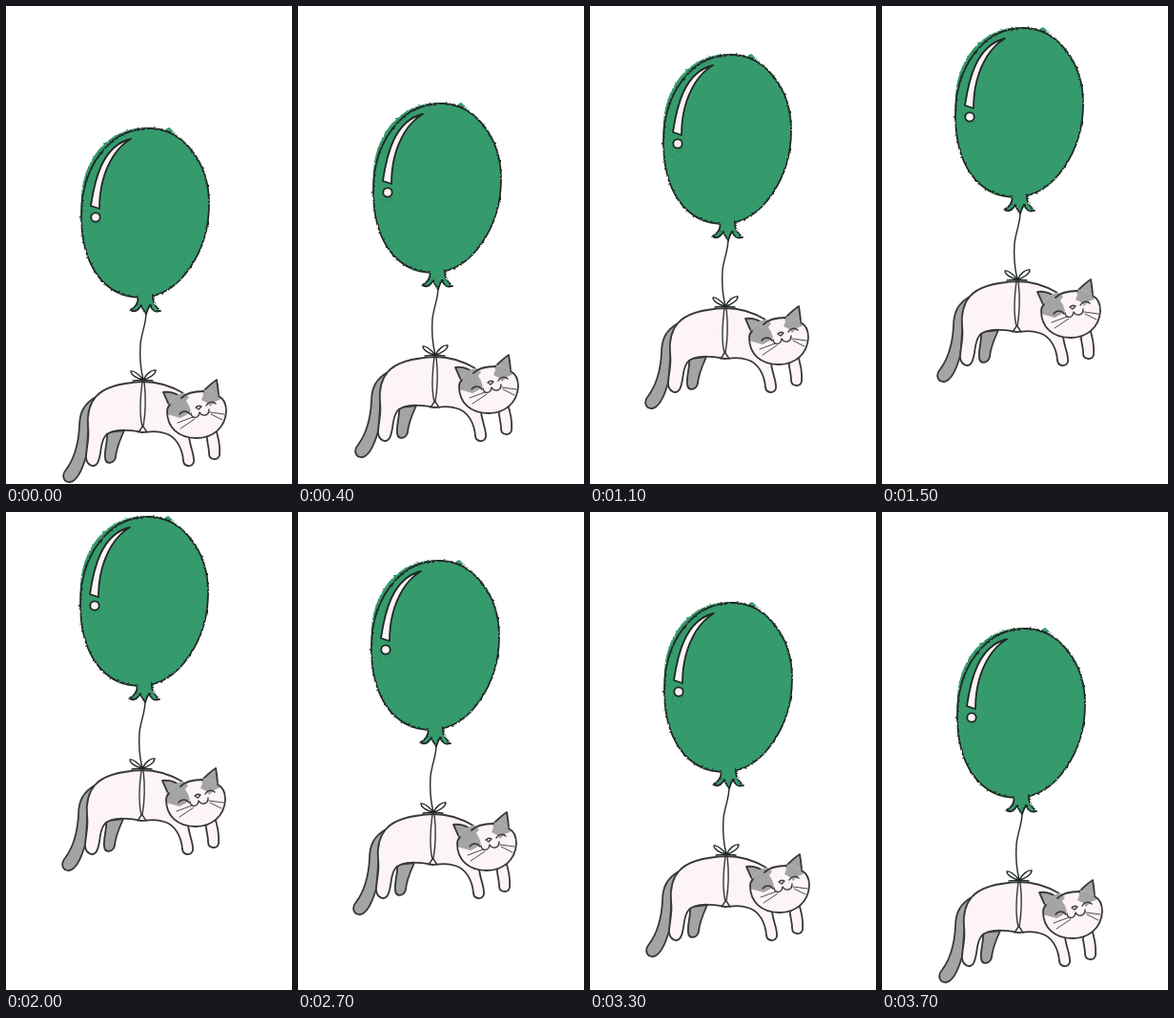
An HTML page for the animation above (3.8 s loop, 300 by 500 pixels).

```html
<!DOCTYPE html>
<html lang="en">
<head>
<meta charset="utf-8">
<title>Balloon cat</title>
<style>
html, body { margin: 0; width: 100%; height: 100%; overflow: hidden; background: #fff; }
svg { display: block; width: 300px; height: 500px; }
.ink { fill: none; stroke: #222827; stroke-width: 1.8; stroke-linecap: round; stroke-linejoin: round; }
.line { stroke-width: 1.4; }
.thin { stroke-width: .9; }
.fur { fill: #fdf4f5; }
.grey { fill: #a4a4a4; }
.green { fill: #359b6c; }
.cat .ink { stroke: #383838; }
</style>
</head>
<body>
<svg viewBox="0 0 300 500">
  <defs>
    <filter id="rough" x="-5%" y="-5%" width="110%" height="110%" color-interpolation-filters="sRGB">
      <feTurbulence type="fractalNoise" baseFrequency=".35" numOctaves="2" seed="4"/>
      <feDisplacementMap in="SourceGraphic" scale="2.5" xChannelSelector="R" yChannelSelector="G"/>
    </filter>
    <clipPath id="head"><path d="M169 424C170 409 184 403 201 402C219 400 231 410 231 424C230 441 217 452 200 452C181 452 169 441 169 424Z"/></clipPath>
  </defs>
  <g id="flyer">
    <g filter="url(#rough)">
      <path class="green" d="M165 130L171 127L178 133ZM79 217C75 165 104 126 150 127Z"/>
      <path class="ink green" d="M150 128C186 128 213 164 213 207C213 255 184 303 143 305C102 305 79 270 79 219C79 168 109 128 150 128Z"/>
      <path class="ink green" d="M138 304C140 310 135 316 130 318C135 321 139 318 142 313C143 317 145 320 147 322C148 319 149 316 151 313C153 318 157 321 162 319C157 315 153 310 154 302"/>
    </g>
    <g id="specks" fill="#23764f"></g>
    <path class="ink fur" d="M131 139C118 142 107 152 100 167C93 182 91 196 89 209L98 212C98 190 104 171 112 158C117 150 124 143 131 139Z"/>
    <circle class="ink fur" cx="94" cy="221" r="4.7"/>
    <path class="ink line" d="M147 321C147 332 143 339 141 353C140 367 141 379 144 391"/>

    <g class="cat">
      <path class="ink grey" d="M106 446C107 455 103 464 104 473C105 480 113 479 115 472C116 461 120 453 124 444Z"/>
      <path class="ink grey" d="M94 409C82 416 77 425 77 440C76 458 72 473 63 485C58 491 60 498 67 498C75 497 80 485 84 471C86 455 86 438 88 422Z"/>
      <path class="ink fur" d="M212 440C208 450 213 459 213 468C213 475 222 476 224 470C225 459 222 448 219 440Z"/>
      <path class="ink fur" d="M94 409C103 398 122 394 144 393C161 393 174 398 186 405L192 447C191 457 198 468 197 477C195 483 187 482 186 476C185 462 178 450 167 447C156 443 148 446 143 446C128 443 110 442 104 450C98 458 101 468 96 478C92 484 85 480 84 473C84 462 88 453 86 440C85 427 87 417 94 409Z"/>
      <path class="ink line" d="M143 393C141 408 140 428 143 440L139 446M145 393C147 410 146 428 144 440L148 446"/>

      <path class="ink grey" d="M172 419C169 414 167 408 165 404C173 403 180 406 184 410"/>
      <path class="ink grey" d="M207 403C211 399 216 394 221 391C222 397 223 403 223 409"/>
      <path class="fur" d="M169 424C170 409 184 403 201 402C219 400 231 410 231 424C230 441 217 452 200 452C181 452 169 441 169 424Z"/>
      <g class="grey" clip-path="url(#head)">
        <path d="M165 402L186 404L192 409L189 413L192 418L194 424L189 428L183 431L176 429L166 426Z"/>
        <path d="M205 400L207 407L205 412L211 415L214 419L219 414L226 411V399Z"/>
      </g>
      <path class="ink" d="M184 410C189 405 196 403 207 403M223 408C229 411 231 418 231 424C230 441 217 452 200 452C181 452 169 441 169 424C169 421 170 419 172 417"/>
      <path class="ink line" d="M182 427C185 423 190 423 193 427M210 418C212 414 217 413 220 416"/>
      <path class="ink line" d="M194 426C195 432 202 432 203 425C206 430 213 429 213 422"/>
      <path class="ink line fur" d="M199 420Q202 417 205 419L202 422Z"/>
      <path class="ink thin" d="M196 430L180 436M198 432L183 442M214 425L229 427M215 427L227 433"/>
    </g>
    <path class="ink line" d="M144 391C140 386 134 381 131 382C131 386 138 390 144 391C147 385 153 380 157 381C157 385 151 389 144 391L133 392M144 391L154 392"/>
  </g>
</svg>
<script>
const STEP = 100, HALF = 19;
// Rise in pixels at a few steps of the way up; the way down mirrors it.
const rise = [[0, 0], [2, 12], [6, 40], [8, 55], [12, 84], [15, 105], [18, 123], [19, 126]];
const flyer = document.getElementById("flyer");

function height(n) {
  const i = Math.max(1, rise.findIndex(p => p[0] >= n));
  const [a, y0] = rise[i - 1], [b, y1] = rise[i];
  return Math.round(y0 + (y1 - y0) * (n - a) / (b - a));
}

let seed = 7;
const rand = () => (seed = seed * 16807 % 2147483647) / 2147483647;

function speck(cx, cy, rx, ry) {
  const a = rand() * 2 * Math.PI, r = Math.sqrt(rand());
  const x = cx + rx * r * Math.cos(a), y = cy + ry * r * Math.sin(a);
  return `M${x.toFixed(1)} ${y.toFixed(1)}h1v1h-1z`;
}

let dots = "";
for (let i = 0; i < 28; i++) dots += speck(92, 230, 8, 8) + speck(146, 217, 59, 80);
document.getElementById("specks").innerHTML = `<path d="${dots}" opacity=".5"/>`;

function draw(now) {
  const n = Math.floor(now / STEP) % (2 * HALF);
  const y = height(Math.min(n, 2 * HALF - n));
  const x = Math.max(0, Math.round(2 - ((y - 88) / 45) ** 2));
  flyer.setAttribute("transform", `translate(${-x} ${-y})`);
  requestAnimationFrame(draw);
}
draw(0);
</script>
</body>
</html>
```
